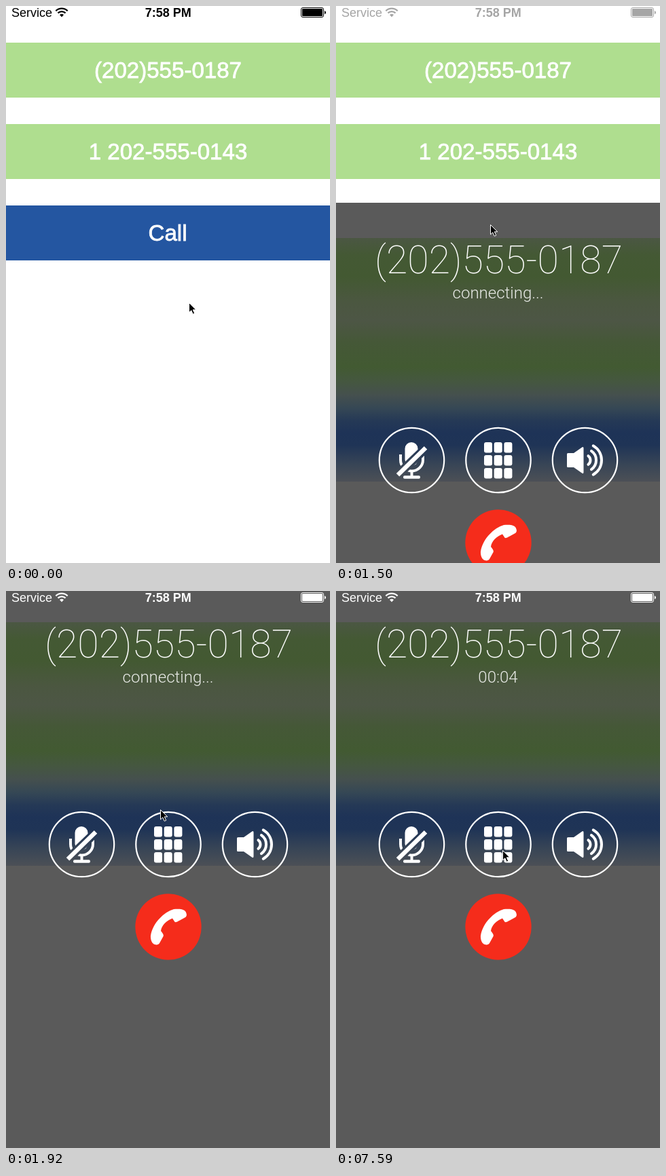
Animation, 477 px wide and 821 px high, one loop 8 s. Source, as an HTML page:

```html
<!DOCTYPE html>
<html lang="en">
<head>
<meta charset="utf-8">
<title>Call screen</title>
<style>
  html, body { margin: 0; width: 100%; height: 100%; overflow: hidden; background: #fff; }
  svg { display: block; width: 477px; height: 821px; }
  text { font-family: "Liberation Sans", Arial, sans-serif; }
  .mid { text-anchor: middle; }
  .key { font-size: 33.1px; fill: #fff; stroke: #fff; stroke-width: .8px; }
  .thin { font-family: Roboto, "Liberation Sans", sans-serif; fill: #fff; }
  .line { fill: none; stroke: #fff; }
</style>
</head>
<body>
<svg viewBox="0 0 477 821">
  <defs>
    <linearGradient id="blur" gradientUnits="userSpaceOnUse" x1="0" y1="46" x2="0" y2="405">
      <stop offset="0" stop-color="#4b5743"/>
      <stop offset=".07" stop-color="#445934"/>
      <stop offset=".16" stop-color="#435932"/>
      <stop offset=".26" stop-color="#4b5740"/>
      <stop offset=".34" stop-color="#4d5645"/>
      <stop offset=".43" stop-color="#455837"/>
      <stop offset=".53" stop-color="#425a32"/>
      <stop offset=".59" stop-color="#455740"/>
      <stop offset=".645" stop-color="#45504e"/>
      <stop offset=".7" stop-color="#354755"/>
      <stop offset=".75" stop-color="#253956"/>
      <stop offset=".8" stop-color="#1e3357"/>
      <stop offset=".85" stop-color="#1f3456"/>
      <stop offset=".93" stop-color="#384556"/>
      <stop offset="1" stop-color="#4c5056"/>
    </linearGradient>
    <mask id="gap" maskUnits="userSpaceOnUse" x="80" y="340" width="60" height="70">
      <rect x="80" y="340" width="60" height="70" fill="#fff"/>
      <path d="M88 398L136 352" stroke="#000" stroke-width="13"/>
    </mask>
  </defs>

  <rect width="477" height="821" fill="#fff"/>
  <path d="M0 54h477v81H0zM0 174h477v81H0z" fill="#afde8f"/>
  <rect y="294" width="477" height="81" fill="#2456a1"/>
  <text class="mid key" x="238.5" y="105.5">(202)555-0187</text>
  <text class="mid key" x="238.5" y="225.5">1 202-555-0143</text>
  <text class="mid key" id="call" x="238" y="345.5">Call</text>

  <g id="panel">
    <rect y="-6" width="477" height="840" fill="#5a5a5a"/>
    <rect y="46" width="477" height="359" fill="url(#blur)"/>
    <text class="mid thin" x="239.5" y="98" font-size="57.3" font-weight="200">(202)555-0187</text>
    <text class="mid thin" id="state" x="238.5" y="134.5" font-size="24" font-weight="300" fill-opacity=".88"></text>

    <g class="line" stroke-width="2.2">
      <circle cx="111.5" cy="373.5" r="47.7"/>
      <circle cx="239" cy="373.5" r="47.7"/>
      <circle cx="366.5" cy="373.5" r="47.7"/>
    </g>

    <g mask="url(#gap)">
      <rect x="101.5" y="347" width="19" height="35" rx="9.5" fill="#fff"/>
      <path class="line" stroke-width="4" d="M95 365v8a16.5 16.5 0 0 0 33 0v-8M111.5 389v9"/>
    </g>
    <rect x="99" y="396.3" width="25" height="4.4" rx="2" fill="#fff"/>
    <path class="line" stroke-width="6.4" d="M91 395.3L132 355.3"/>

    <g id="pad" fill="#fff"></g>

    <path fill="#fff" d="M341.5 363H350L362.5 354.3Q364.5 353 364.5 356V391Q364.5 394 362.5 392.7L350 384H341.5Q340 384 340 382.5V364.5Q340 363 341.5 363Z"/>
    <g id="waves" class="line" stroke-width="4" stroke-linecap="round"></g>

    <circle cx="239" cy="495" r="48.7" fill="#f52c1b"/>
    <path fill="#fff" d="M264 472C262 469 254 468 247 469C233 473 216 489 213 508C212.5 514 215 520 219 521C222 522 225 521 226 519L231 510C233 507 231 505 228 501C229 493 236 486 245 482.5L248 487C249 489 251 488 253 487L264 481C267 479 266 475 264 472Z"/>
  </g>

  <g id="bar">
    <text x="8" y="15.5" font-size="18">Service</text>
    <text class="mid" x="238.7" y="15.5" font-size="18" font-weight="700">7:58 PM</text>
    <path d="M82 16.3l-3-3.2a4.3 4.3 0 0 1 6 0z"/>
    <g id="wifi" fill="none" stroke="currentColor" stroke-width="2.3"></g>
    <rect x="434.5" y="2.5" width="33" height="14" rx="2.5" fill="none" stroke="currentColor"/>
    <rect x="436" y="4" width="30" height="11" rx="1"/>
    <path d="M469 7q2 .5 2 2.5t-2 2.5z"/>
  </g>

  <path id="cursor" d="M.5 .5V14.8L3.8 11.7L6.2 17.2L8.7 16.1L6.3 10.8H10.8Z" fill="#000" stroke="#fff" stroke-width="1" stroke-linejoin="round"/>
</svg>
<script>
const LOOP = 8000;
const $ = id => document.getElementById(id);
const clamp = v => Math.max(0, Math.min(1, v));
const mix = (a, b, p) => a + (b - a) * p;
const smooth = p => p * p * (3 - 2 * p);

// Arc centred on an angle, in degrees, spreading equally to both sides
function arc(cx, cy, r, mid, spread) {
  const at = a => {
    const q = a * Math.PI / 180;
    return (cx + r * Math.cos(q)).toFixed(2) + ' ' + (cy + r * Math.sin(q)).toFixed(2);
  };
  return `<path d="M${at(mid - spread)}A${r} ${r} 0 0 1 ${at(mid + spread)}"/>`;
}

$('wifi').innerHTML = [8, 12.5].map(r => arc(82, 16.2, r, -90, 44)).join('');
$('waves').innerHTML = [[8, 52], [16.5, 55], [24.5, 60]]
  .map(([r, s]) => arc(366.5, 373.5, r, 0, s)).join('');
for (let i = 0; i < 9; i++) {
  const x = 218 + i % 3 * 14.7, y = 347 + Math.floor(i / 3) * 19;
  $('pad').innerHTML += `<rect x="${x}" y="${y}" width="12" height="15.5" rx="3"/>`;
}

// Progress in equal jumps: the first at the start time, the last at the end time
function steps(t, start, end, count) {
  if (t < start) return 0;
  const gap = (end - start) / (count - 1);
  return clamp((Math.floor((t - start) / gap + 1e-6) + 1) / count);
}

// The screen change refreshes only at these times
const ticks = [1280, 1340, 1440, 1500, 1590, 1680, 1760, 1840, 1920];
const hold = t => ticks.reduce((last, k) => t >= k ? k : last, 0);

// Critically damped spring from the bottom edge to rest
function slide(k) {
  if (k < 1440) return 830;
  if (k >= 1920) return 0;
  const w = (k - 1393.8) * .0205;
  return Math.round(821 * (1 + w) * Math.exp(-w));
}

function label(t) {
  if (t < 4550) return 'connecting...';
  const n = 1 + [5560, 6570, 7590].filter(s => t >= s).length;
  return '00:0' + n;
}

function draw(t) {
  const k = hold(t);
  $('panel').setAttribute('transform', `translate(0 ${slide(k)})`);
  $('call').setAttribute('opacity', k < 1280 ? 1 : k < 1340 ? .2 : k < 1440 ? .3 : .6);
  $('state').textContent = label(t);

  const p = clamp((k - 1390) / 220);
  const v = Math.round(255 * (1 - (1 - p) ** 1.5));
  const tone = `rgb(${v},${v},${v})`;
  $('bar').style.fill = $('bar').style.color = tone;

  const a = smooth(steps(t, 60, 440, 6));
  const b = smooth(steps(t, 5330, 6090, 13));
  const x = mix(mix(269, 227, a), 245, b);
  const y = mix(mix(437, 322, a), 382, b);
  $('cursor').setAttribute('transform', `translate(${x.toFixed(1)} ${y.toFixed(1)})`);
}

const begin = performance.now();
function frame() {
  draw((performance.now() - begin) % LOOP);
  requestAnimationFrame(frame);
}
draw(0);
requestAnimationFrame(frame);
</script>
</body>
</html>
```
